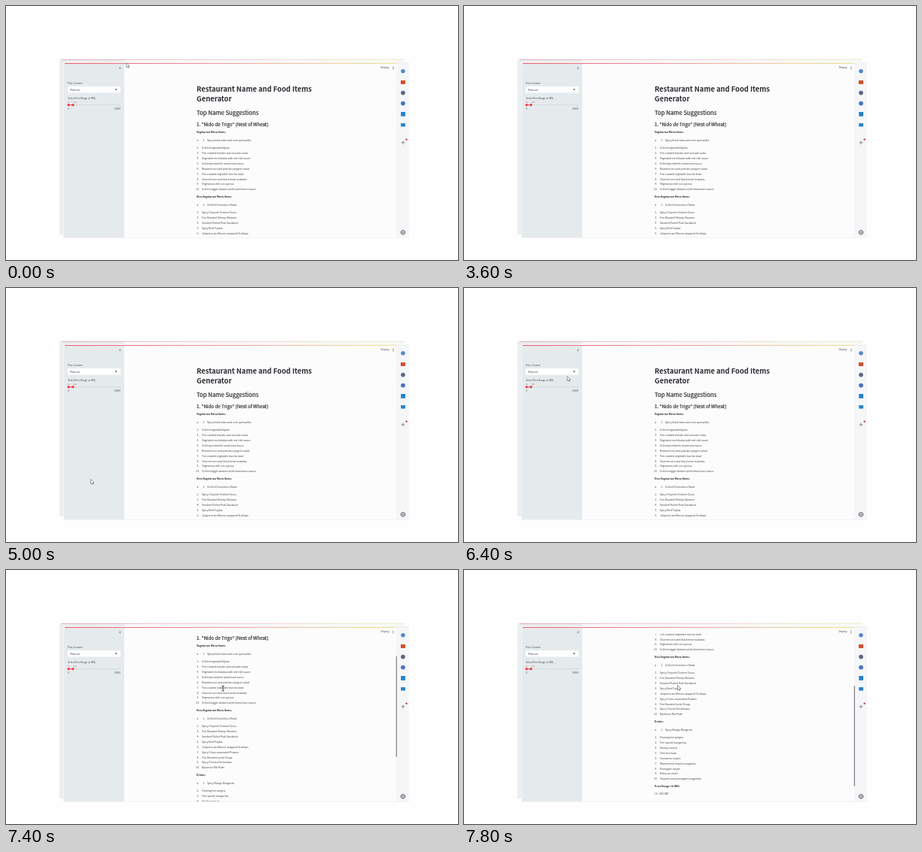
Animation of 600x338 px, one loop 8 s. Source, as an HTML page:

```html
<!DOCTYPE html>
<html lang="en">
<head>
<meta charset="utf-8">
<style>
  html, body { margin: 0; width: 100%; height: 100%; overflow: hidden; background: #fefefe; }
  svg { display: block; width: 600px; height: 338px; }
  text { font-family: "Noto Sans CJK JP", "Noto Sans CJK SC", "Noto Sans CJK", "Open Sans", sans-serif; fill: #2b2c31; white-space: pre; }
  .small { font-size: 3.4px; fill: #42434a; }
  .tiny { font-size: 3px; }
  .bold { font-weight: 700; fill: #2b2c31; }
  .medium { stroke: #2b2c31; stroke-width: .2px; }
</style>
</head>
<body>
<svg viewBox="0 0 600 338">
  <defs>
    <linearGradient id="bar">
      <stop offset="0" stop-color="#f0566e"/>
      <stop offset=".4" stop-color="#f3909c"/>
      <stop offset=".7" stop-color="#f5c3a0"/>
      <stop offset="1" stop-color="#f3e58e"/>
    </linearGradient>
    <clipPath id="page"><path d="M157 85H519V308H157Z"/></clipPath>
  </defs>

  <!-- window and its offset backing -->
  <path d="M71 70.500H529V304H71Z" fill="#eaeeef"/>
  <path d="M76 75H535V309H76Z" fill="#f1f3f4"/>
  <path d="M157 71H529V75H157Z" fill="#f8f9f9"/>
  <path d="M77 77H157V308H77Z" fill="#e5ebed"/>
  <path d="M157 77H518.500V308H157Z" fill="#fcfcfd"/>
  <path d="M518.500 77H535V308H518.500Z" fill="#f5f6f8"/>
  <rect x="74" y="71" width="455" height="1" fill="url(#bar)" opacity=".4"/>
  <rect x="78" y="76" width="440" height="1" fill="url(#bar)"/>

  <g clip-path="url(#page)"><g id="doc">
    <g font-size="9.400" font-weight="700">
      <text x="253" y="114">Restaurant Name and Food Items</text>
      <text x="253" y="126.500">Generator</text>
    </g>
    <text class="medium" x="253" y="145.200" font-size="7.750">Top Name Suggestions</text>
    <text class="medium" x="253" y="159.800" font-size="6.150">1. "Nido de Trigo" (Nest of Wheat)</text>
  </g></g>
  <rect id="thumb" x="517.700" width="1.300" height="134" rx=".6" fill="#85878b"/>

  <!-- header and sidebar controls -->
  <text class="small" x="497.500" y="83.300">Deploy</text>
  <path d="M514 81v.01M514 82.500v.01M514 84v.01" stroke="#444" stroke-linecap="round"/>
  <path d="M150.200 81.500l2.400 2.400m0-2.400l-2.400 2.400" stroke="#555" stroke-width=".6"/>
  <text class="small tiny" x="82.300" y="104">Pick a Cuisine</text>
  <rect x="82" y="107" width="70" height="8.600" rx="1" fill="#fdfefe"/>
  <text class="small" x="85" y="112.500">Mexican</text>
  <path d="M144.700 110.600h3l-1.500 1.700z" fill="#333"/>
  <text class="small tiny" x="82.300" y="124.200">Select Price Range (in INR)</text>
  <g font-size="2.800">
    <text x="82" y="128.600" style="fill:#d8606a">10</text>
    <text x="89.500" y="128.600" style="fill:#d8606a">500</text>
  </g>
  <path d="M83 131.700H152" stroke="#cdd3d7" stroke-width=".8"/>
  <path d="M83 131.700H89" stroke="#ef4350"/>
  <circle cx="83" cy="131.700" r="1.600" fill="#ef3644"/>
  <circle cx="89" cy="131.700" r="1.600" fill="#ef3644"/>
  <text class="small tiny" x="82.300" y="138">0</text>
  <text class="small tiny" x="143.500" y="138">10000</text>

  <!-- side strip -->
  <circle cx="527" cy="86.800" r="2.700" fill="#5287cc"/>
  <rect x="524" y="99" width="6" height="5" fill="#d2502f"/>
  <circle cx="527" cy="115.600" r="2.800" fill="#5c6480"/>
  <circle cx="527" cy="129.600" r="2.900" fill="#4974c4"/>
  <rect x="524.200" y="141" width="5.800" height="5.800" fill="#2380cc"/>
  <rect x="524.200" y="156" width="5.800" height="4.500" fill="#2c82c8"/>
  <path d="M524.500 181.800h5m-2.500-2.500v5" stroke="#666" stroke-width=".7"/>
  <circle cx="531.600" cy="177.700" r="1.100" fill="#b01c2c"/>
  <g fill="none" stroke="#44474c">
    <path d="M527 298.300l2.600 1.500v3l-2.600 1.500l-2.600-1.500v-3z" stroke-width=".9"/>
    <circle cx="527" cy="301.300" r="1" stroke-width=".7"/>
  </g>

  <path id="arrow" d="M0 0V6.200L1.500 4.900L2.500 7.100L3.500 6.600L2.500 4.500H4.500Z" fill="#fff" stroke="#555962" stroke-width=".6"/>
  <path id="beam" d="M-1.500-3.200H1.500M0-3.200V3.200M-1.500 3.200H1.500" fill="none" stroke="#222" stroke-width=".8"/>
</svg>
<script>
const $ = id => document.getElementById(id);
const doc = $('doc'), arrow = $('arrow'), beam = $('beam'), thumb = $('thumb');

function add(tag, attrs) {
  const el = document.createElementNS('http://www.w3.org/2000/svg', tag);
  for (const name in attrs) el.setAttribute(name, attrs[name]);
  doc.append(el);
  return el;
}

function write(x, y, words, kind = 'small') {
  add('text', { x, y: y + 1.2, class: kind }).textContent = words;
}

function section(y, title, first, items) {
  write(253, y, title, 'small bold');
  add('circle', { cx: 254.3, cy: y + 11, r: .7, fill: '#42434a' });
  write(261.500, y + 11, '1.');
  write(267, y + 11, first);
  items.forEach((item, i) => {
    const row = y + 21.2 + i * 6.85;
    write(i < 8 ? 253.5 : 252, row, `${i + 2}.`);
    write(260, row, item);
  });
}

section(168, 'Vegetarian Menu Items:', 'Spicy black bean and corn quesadilla', [
  'Grilled vegetable fajitas', 'Fire-roasted tomato and avocado salsa',
  'Vegetable enchiladas with red chili sauce', 'Grilled portobello mushroom tacos',
  'Roasted corn and poblano pepper salad', 'Fire-roasted vegetable burrito bowl',
  'Charred corn and black bean tostadas', 'Vegetarian chili con quinoa',
  'Grilled veggie skewers with chimichurri sauce']);
section(254, 'Non-Vegetarian Menu Items:', 'Grilled Chimichurri Steak', [
  'Spicy Chipotle Chicken Tacos', 'Fire-Roasted Shrimp Skewers',
  'Smoked Pulled Pork Sandwich', 'Spicy Beef Fajitas',
  'Jalapeno and Bacon-wrapped Scallops', 'Spicy Citrus-marinated Prawns',
  'Fire-Roasted Lamb Chops', 'Spicy Chorizo Enchiladas', 'Barbecue Rib Plate']);
section(340, 'Drinks:', 'Spicy Mango Margarita', [
  'Flaming hot sangria', 'Fire-spiced margaritas', 'Smoky mezcal', 'Chili horchata',
  'Cinnamon mojito', 'Watermelon tequila margarita', 'Pineapple mojito',
  'Hibiscus cooler', 'Chipotle and pineapple margaritas']);
write(253, 426, 'Price Range (in INR):', 'small bold');
write(253, 436, '10 - 500 INR');

// Pointer keys: time, x, y
const path = [
  [3800, 483, 78], [4000, 478, 96], [4200, 474.500, 105.500], [4400, 474.500, 105.500],
  [5000, 112.500, 254.500], [5600, 136.500, 159], [6400, 137, 117.500], [6800, 137, 116],
  [7200, 288, 157.500], [7400, 288, 157.500], [7800, 283.500, 153.500]];
const scrolls = [[0, 0], [7200, 0], [7400, 67], [7600, 115], [7800, 138]];

function at(keys, t) {
  const i = keys.findIndex(k => k[0] >= t);
  if (i < 1) return keys[Math.max(i, 0)].slice(1);
  const a = keys[i - 1], b = keys[i], p = (t - a[0]) / (b[0] - a[0]);
  return a.slice(1).map((v, j) => v + (b[j + 1] - v) * p);
}

function draw(now) {
  const t = Math.floor(now % 8000 / 200) * 200;
  const [scroll] = at(scrolls, t);
  const [x, y] = t < 600 ? [159.7, 75.5] : at(path, t);
  const reading = t >= 7200 && t < 7800;
  const shown = t < 600 || t >= 3800;
  doc.setAttribute('transform', `translate(0 ${-scroll})`);
  thumb.setAttribute('y', 78 + scroll * .55);
  thumb.setAttribute('visibility', scroll ? 'visible' : 'hidden');
  for (const [el, on] of [[arrow, shown && !reading], [beam, reading]]) {
    el.setAttribute('transform', `translate(${x} ${y})`);
    el.setAttribute('visibility', on ? 'visible' : 'hidden');
  }
  requestAnimationFrame(draw);
}
requestAnimationFrame(draw);
</script>
</body>
</html>
```
